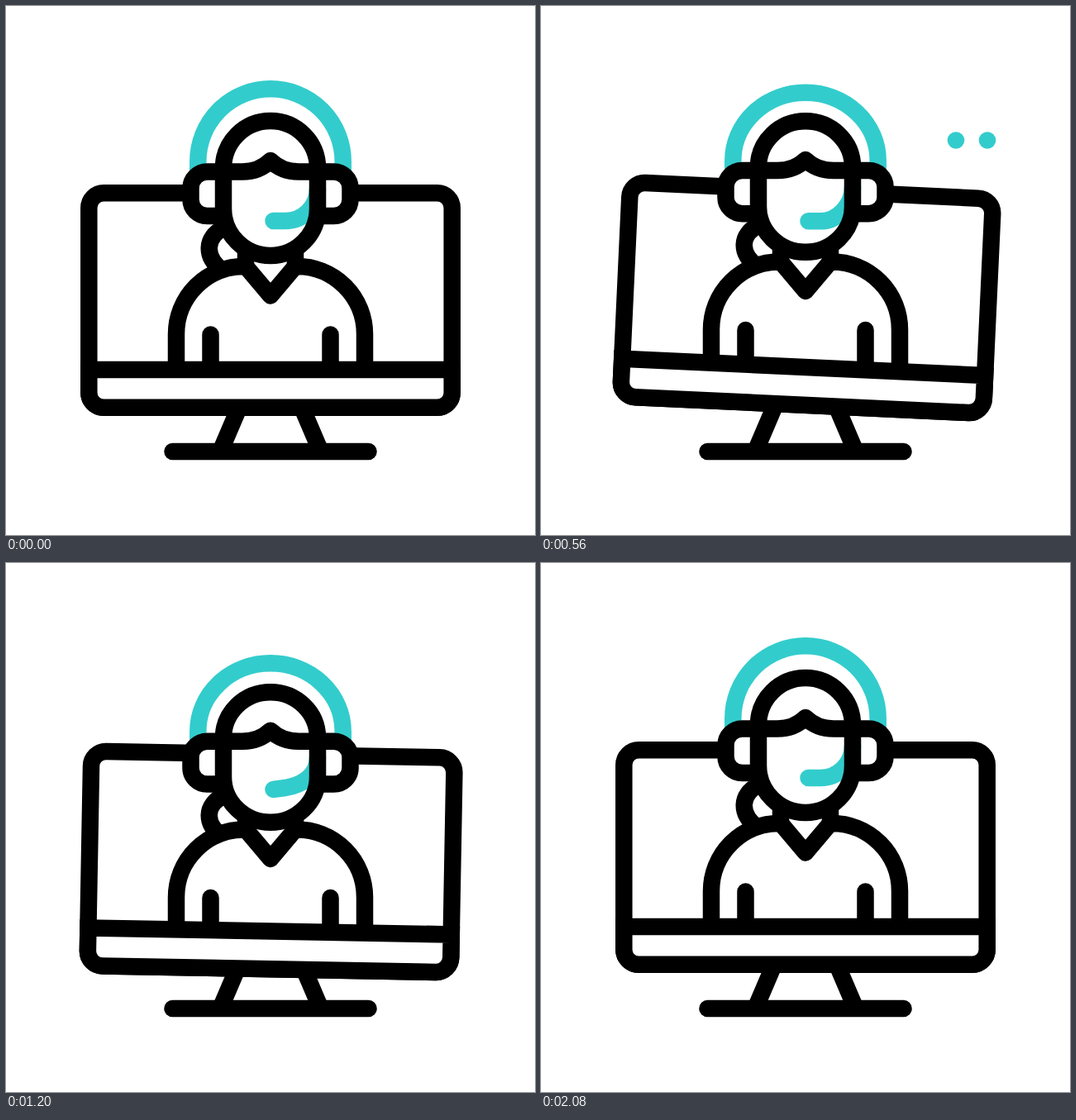
Write an HTML page without scripts that moves like this. It is 640 px wide and 640 px high and loops after 2.4 s.

```html
<!DOCTYPE html>
<html lang="en">
<head>
<meta charset="utf-8">
<title>Online support</title>
<style>
  html, body { margin: 0; width: 100%; height: 100%; overflow: hidden; background: #fff; }
  svg { display: block; width: 100vw; height: 100vh; }

  .ink, .teal { stroke-width: 20.5; stroke-linejoin: round; vector-effect: non-scaling-stroke; }
  .ink { stroke: #000; fill: none; }
  .teal { stroke: #3cc; fill: none; }
  .white { fill: #fff; }
  .round { stroke-linecap: round; }

  .screen, .body, .head, .band {
    animation: 2.4s cubic-bezier(.37, 0, .63, 1) infinite;
  }
  .screen { transform-origin: 320px 390px; animation-name: screen-bob, screen-tilt; }
  .body { animation-name: body-bob; }
  .head {
    transform-origin: 320px 196px;
    animation-name: head-bob, head-squash;
    animation-timing-function: cubic-bezier(.37, 0, .63, 1), linear;
  }
  .band { transform-origin: 320px 190px; animation-name: band-squash; }
  .mic { animation: mic-sway 2.4s linear infinite; }

  @keyframes screen-bob {
    0%, 61.667%, 100% { translate: 0 0; }
    12.5% { translate: 0 10px; }
    30.2% { translate: 0 -9.3px; }
    47.083% { translate: 0 6px; }
  }
  @keyframes screen-tilt {
    0%, 5%, 68.333%, 100% { rotate: 0deg; }
    22.5% { rotate: 2.7deg; }
    39.167% { rotate: -3deg; }
    55% { rotate: 2.2deg; }
  }
  @keyframes body-bob {
    0%, 82.5%, 100% { translate: 0 0; }
    13.333% { translate: 0 13px; }
    33.75% { translate: 0 -25px; }
    47.917% { translate: 0 8.3px; }
    64.167% { translate: 0 -12px; }
  }
  @keyframes head-bob {
    0%, 82.917%, 100% { translate: 0 0; }
    14.583% { translate: 0 19px; }
    34.167% { translate: 0 -29.3px; }
    48.542% { translate: 0 16px; }
    64.583% { translate: 0 -15px; }
  }
  @keyframes head-squash {
    0%, 83.333%, 100% { scale: 1 1; }
    10%, 61.667% { scale: 1 .984; }
    23.333% { scale: 1 .972; }
    33.333% { scale: 1 .988; }
    50% { scale: 1 .967; }
  }
  @keyframes band-squash {
    0%, 83.333%, 100% { scale: 1 1; }
    16.667% { scale: 1 .93; }
    34.167% { scale: 1 1.04; }
    48.75% { scale: 1 .97; }
    64.583% { scale: 1 1.01; }
  }
  @keyframes mic-sway {
    0%, 83.333%, 100% { d: path("M323.5 260L338 260C359 260 377 243 377 221"); }
    10% { d: path("M323.5 263.7L338 263.2C359 262 377 243 377 221"); }
    23.333% { d: path("M323.5 263.5L338 263.5C359 263.5 377 243 377 221"); }
    33.333% { d: path("M323.5 256.2L338 260.3C359 265 377 243 377 221"); }
    50% { d: path("M323.5 260.7L338 258.7C359 255 377 243 377 221"); }
    61.667% { d: path("M323.5 257.5L338 259.5C359 262 377 243 377 221"); }
  }

  .dot { fill: #3cc; opacity: 0; animation: blink 1.2s steps(3) infinite; }
  .dot:nth-child(2) { animation-delay: .16s; }
  .dot:nth-child(3) { animation-delay: .32s; }
  @keyframes blink {
    0%, 46.667%, 100% { opacity: 0; }
    10%, 36.667% { opacity: 1; }
  }
</style>
</head>
<body>
<svg viewBox="0 0 640 640">
  <!-- stand -->
  <path class="ink" d="M290 467L261 535M350 467L379 535"/>
  <path class="ink round" d="M201.5 539H438.5"/>

  <g class="screen">
    <rect class="ink white" x="100.3" y="226.2" width="439.4" height="259.6" rx="18"/>
  </g>

  <!-- headband and ponytail -->
  <g class="head">
    <path class="teal band" d="M232.3 206V188A87.7 87.7 0 0 1 407.7 188V206"/>
    <path class="ink" d="M264 268C240 280 240 304 262 320"/>
  </g>

  <g class="body">
    <path class="ink" d="M290 318V282M350 318V282"/>
    <path class="ink white" d="M206 472V397A82 82 0 0 1 288 315H290L320 350.5L350 315H352A82 82 0 0 1 434 397V472"/>
    <path class="ink round" d="M247.5 397.5V460M392.5 397.5V460"/>
  </g>

  <!-- lower panel covers the body -->
  <g class="screen">
    <path class="ink white" style="stroke-linejoin:miter" d="M100.3 440H539.7V467.8A18 18 0 0 1 521.7 485.8H118.3A18 18 0 0 1 100.3 467.8Z"/>
  </g>

  <g class="head">
    <rect class="ink white" x="223.5" y="200.5" width="193" height="53.5" rx="20"/>
    <path class="white" d="M263 196A57 57 0 0 1 377 196V245A57 57 0 0 1 263 245Z"/>
    <path class="teal round mic" d="M323.5 260L338 260C359 260 377 243 377 221"/>
    <path class="ink" d="M263 196A57 57 0 0 1 377 196V245A57 57 0 0 1 263 245Z"/>
    <path class="ink" d="M263 200.5H286C302 200.5 313 194 320 187C327 194 338 200.5 354 200.5H377"/>
  </g>

  <g>
    <circle class="dot" cx="463" cy="162.5" r="10.3"/>
    <circle class="dot" cx="502" cy="162.5" r="10.3"/>
    <circle class="dot" cx="540" cy="162.5" r="10.3"/>
  </g>
</svg>
</body>
</html>
```
